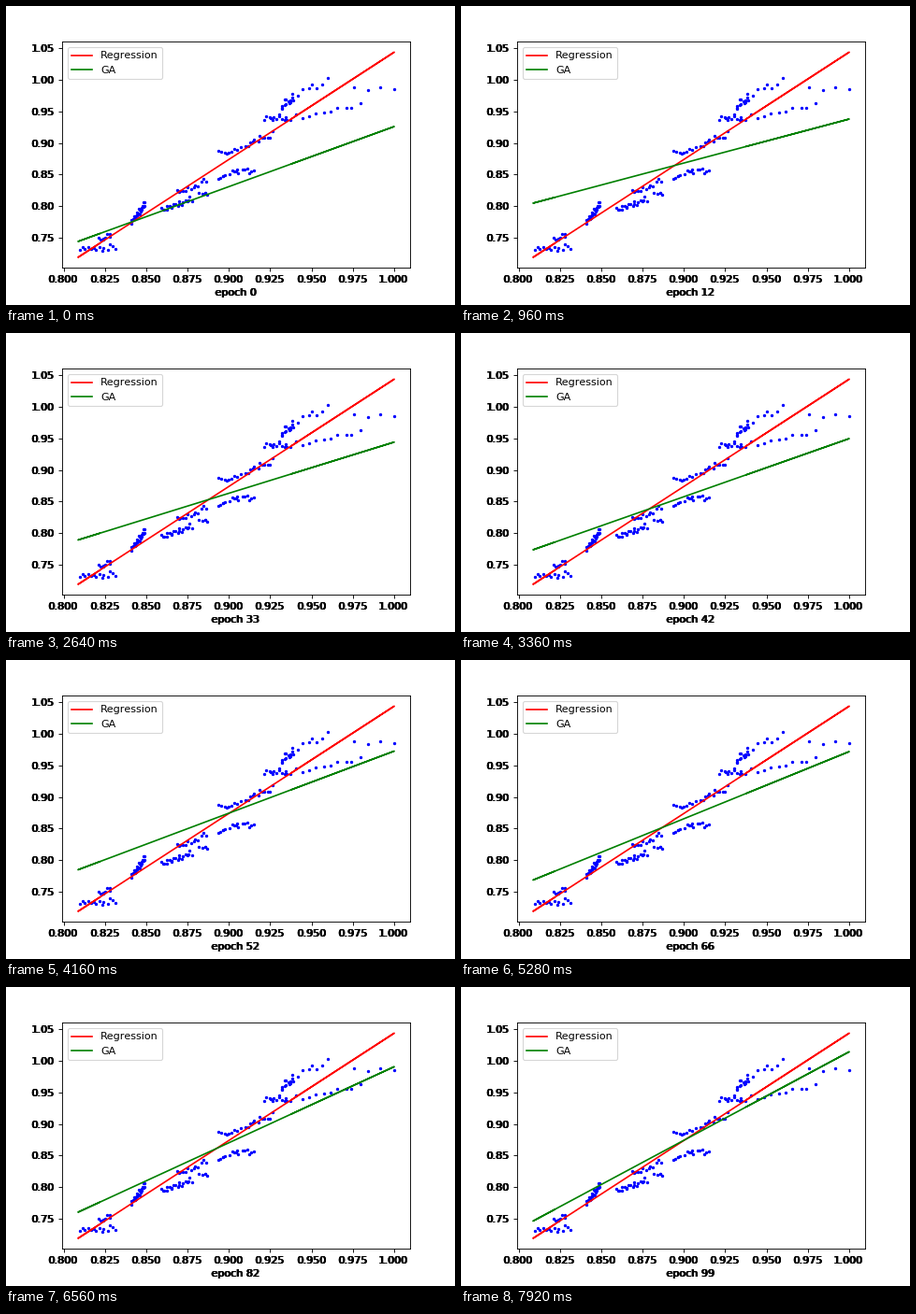
A matplotlib script for the animation above (8000 ms loop, 480 by 320 pixels).

```python
import matplotlib.pyplot as plt
import numpy as np
from matplotlib.animation import FuncAnimation

DPI = 80
WIDTH, HEIGHT = 480, 320
FRAMES, INTERVAL = 100, 80
LEFT, RIGHT, TOP, BOTTOM = 60, 432, 38.4, 280
XLIM, YLIM = (0.79915, 1.00956), (0.7026, 1.0605)
LINE_X = np.array([100, 77, 415, 305])  # doubles back, which thickens the ends

# Runs of samples in stage pixels: start, end, count.
RUNS = [
    ((78, 261), (117, 257), 14), ((99, 250), (112, 244), 8),
    ((134, 231), (149, 211), 24), ((166, 219), (198, 206), 20),
    ((182, 198), (213, 187), 13), ((207, 199), (216, 202), 5),
    ((226, 182), (264, 175), 17), ((226, 157), (258, 150), 11),
    ((260, 144), (286, 137), 10), ((277, 120), (303, 119), 14),
    ((294, 107), (307, 97), 14), ((312, 93), (343, 80), 7),
    ((309, 119), (378, 106), 10), ((371, 90), (415, 89), 4),
]

# Ends of the GA line at a few epochs; it drifts between them.
KEY_EPOCHS = [0, 4, 12, 24, 42, 52, 66, 82, 99]
KEY_LEFT = [252, 222, 211, 211, 232, 224.5, 235.5, 241, 250.5]
KEY_RIGHT = [129, 86.5, 121, 120.5, 113, 97.5, 98, 85.3, 69.3]


def to_data(x, y):
    u = (np.asarray(x) - LEFT) / (RIGHT - LEFT)
    v = (BOTTOM - np.asarray(y)) / (BOTTOM - TOP)
    return XLIM[0] + u * np.ptp(XLIM), YLIM[0] + v * np.ptp(YLIM)


def fit_line(left_y, right_y):
    return to_data(LINE_X, left_y + (right_y - left_y) * (LINE_X - 77) / 338)


def samples():
    rng = np.random.default_rng(4)
    runs = [np.linspace(*run) + rng.uniform(-1, 1, (run[2], 2)) * (1.5, 3.5)
            for run in RUNS]
    return np.vstack(runs).T


def add_layer(shift=0):
    box = [(LEFT + shift) / WIDTH, 1 - BOTTOM / HEIGHT,
           (RIGHT - LEFT) / WIDTH, (BOTTOM - TOP) / HEIGHT]
    layer = fig.add_axes(box, xlim=XLIM, ylim=YLIM, facecolor="none")
    layer.set_xticks(np.arange(0.8, 1.001, 0.025))
    layer.set_yticks(np.arange(0.75, 1.051, 0.05))
    layer.xaxis.set_major_formatter("{x:.3f}")
    layer.yaxis.set_major_formatter("{x:.2f}")
    return layer


def add_label_layer(shift):
    layer = add_layer(shift)
    layer.spines[:].set_visible(False)
    layer.tick_params(length=0, pad=7)
    return layer


plt.rcParams.update({"font.family": "DejaVu Sans", "font.size": 10,
                     "text.kerning_factor": 6})
fig = plt.figure(figsize=(WIDTH / DPI, HEIGHT / DPI), dpi=DPI, facecolor="white")

# Labels outside the plot are struck repeatedly, one pixel apart.
ax = add_layer()
layers = [ax] + [add_label_layer(shift) for shift in (0, -1, -1)]
ax.scatter(*to_data(*samples()), s=4, color="blue")
ax.plot(*fit_line(269, 49.4), color="red", label="Regression")
(ga_line,) = ax.plot(*fit_line(KEY_LEFT[0], KEY_RIGHT[0]), color="green", label="GA")
ax.legend(loc="upper left")


def update(epoch):
    ends = [np.interp(epoch, KEY_EPOCHS, key) for key in (KEY_LEFT, KEY_RIGHT)]
    ga_line.set_data(*fit_line(*ends))
    for layer in layers:
        layer.set_xlabel(f"epoch {epoch}")
    return (ga_line,)


anim = FuncAnimation(fig, update, frames=FRAMES, interval=INTERVAL,
                     repeat=True, repeat_delay=0, blit=False)
plt.show()
```
